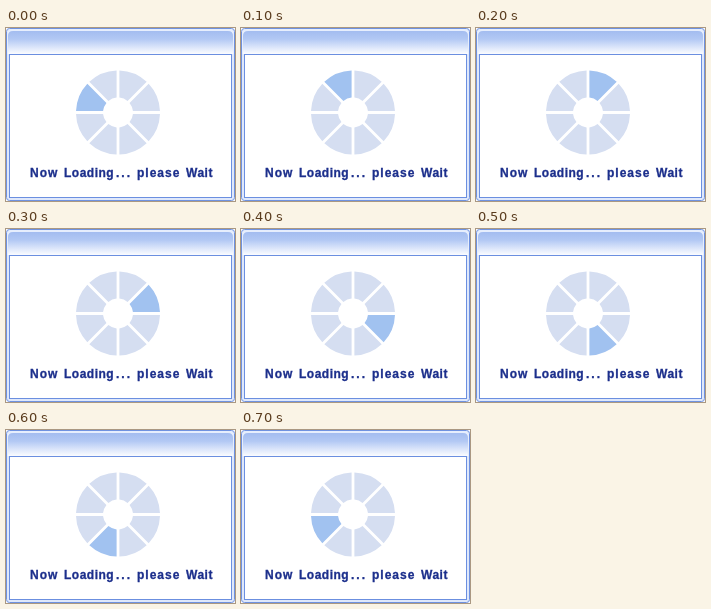
An HTML page that plays this animation: 229 px wide and 173 px high, repeating every 0.8 s.

```html
<!DOCTYPE html>
<html lang="en">
<head>
<meta charset="utf-8">
<title>Loading</title>
<style>
html, body { margin: 0; width: 100%; height: 100%; overflow: hidden; background: #fff; }
svg { display: block; width: 229px; height: 173px; }
.wedge { fill: #d5def1; animation: lit 800ms step-end infinite; animation-delay: calc(var(--i) * 100ms - 800ms); }
@keyframes lit {
  0% { fill: #a1c2f0; }
  12.5%, 100% { fill: #d5def1; }
}
text { font: bold 12px "Liberation Sans", Arial, sans-serif; letter-spacing: 1px; fill: #1c2f8c; stroke: #1c2f8c; stroke-width: .3px; }
.tight { letter-spacing: .5px; }
.dots { letter-spacing: 2px; }
</style>
</head>
<body>
<svg viewBox="0 0 229 173">
  <defs>
    <linearGradient id="bar" x1="0" y1="0" x2="0" y2="1">
      <stop offset="0" stop-color="#a3bcf0"/>
      <stop offset=".35" stop-color="#b2c8f4"/>
      <stop offset=".75" stop-color="#e0e9fb"/>
      <stop offset="1" stop-color="#fbfcff"/>
    </linearGradient>
  </defs>
  <rect x=".5" y=".5" width="228" height="172" rx="3" fill="#dfe8fb" stroke="#6f92e0"/>
  <path d="M1 26V6Q1 1 6 1H223Q228 1 228 6V26Z" fill="#e6eefd"/>
  <path d="M2 26V8Q2 3 7 3H222Q227 3 227 8V26Z" fill="url(#bar)"/>
  <rect x="3.5" y="26.5" width="222" height="143" fill="#fff" stroke="#6b8fe0"/>
  <g id="ring" transform="translate(112 84.5)"></g>
  <text y="149"><tspan x="24">Now</tspan> <tspan class="tight" x="58">Loading</tspan><tspan class="dots" x="110">...</tspan> <tspan x="131">please</tspan> <tspan class="tight" x="180">Wait</tspan></text>
</svg>
<script>
const ring = document.getElementById("ring");
const outer = 42, inner = 15, gap = 1.4;

// Point on a circle where a spoke shifted sideways by `shift` meets it
function spoke(angle, radius, shift) {
  const a = angle + Math.asin(shift / radius);
  return (radius * Math.sin(a)).toFixed(2) + " " + (-radius * Math.cos(a)).toFixed(2);
}

for (let i = 0; i < 8; i++) {
  const from = (i - 2) * Math.PI / 4, to = from + Math.PI / 4;
  const wedge = document.createElementNS("http://www.w3.org/2000/svg", "path");
  wedge.setAttribute("class", "wedge");
  wedge.setAttribute("d",
    `M${spoke(from, outer, gap)}A${outer} ${outer} 0 0 1 ${spoke(to, outer, -gap)}` +
    `L${spoke(to, inner, -gap)}A${inner} ${inner} 0 0 0 ${spoke(from, inner, gap)}Z`);
  wedge.style.setProperty("--i", i);
  ring.append(wedge);
}
</script>
</body>
</html>
```
